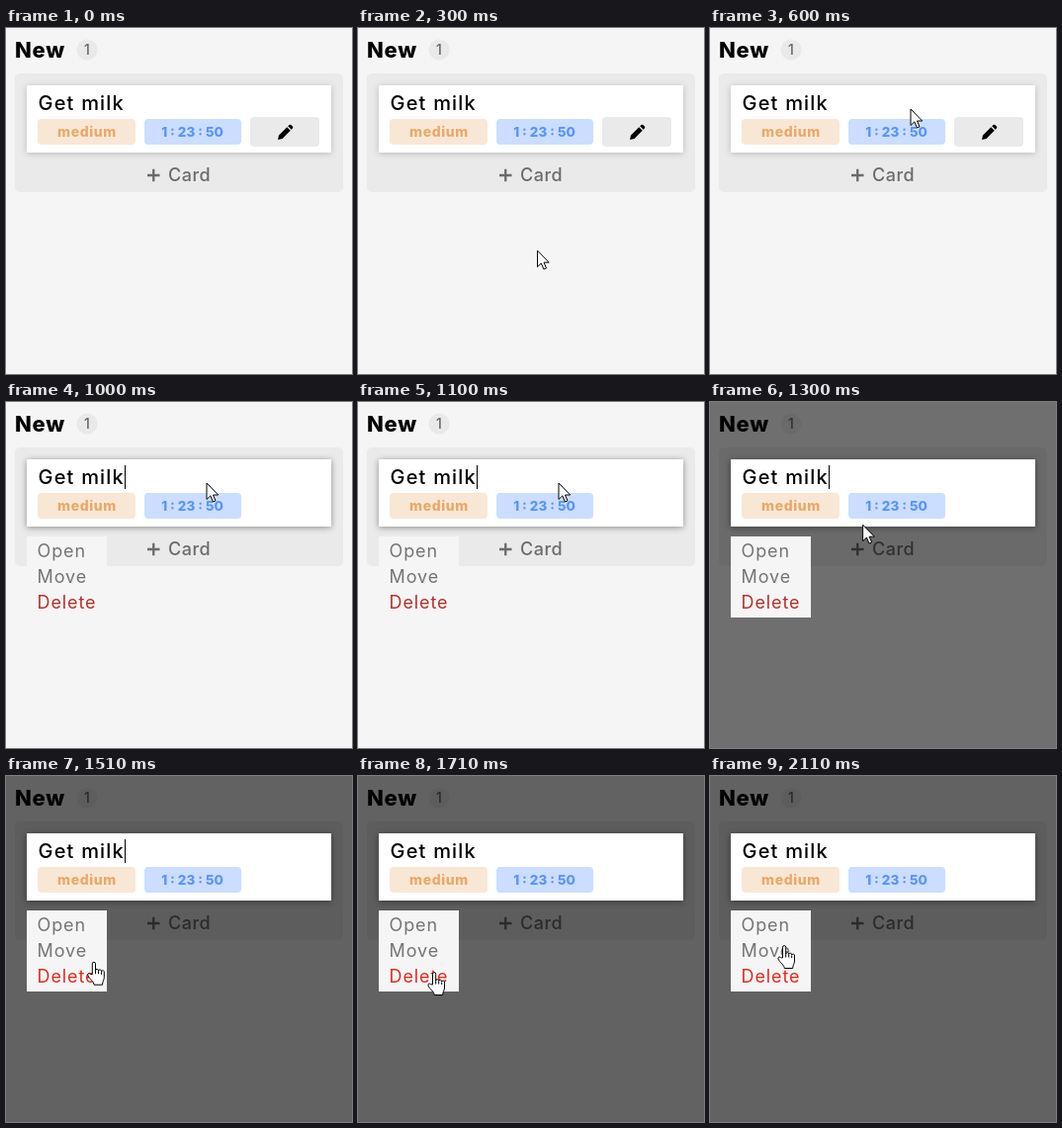
An HTML page that plays this animation: 350 by 350 pixels, repeating every 2.21 s.

```html
<!DOCTYPE html>
<html lang="en">
<head>
<meta charset="utf-8">
<title>Card menu</title>
<style>
  html, body { margin: 0; height: 100%; overflow: hidden; background: #f5f5f5; }
  svg { display: block; width: 350px; height: 350px; font: 500 18px Montserrat, Inter, sans-serif; }
  .title { font-weight: 800; font-size: 22px; letter-spacing: .7px; }
  .name { font-size: 20px; letter-spacing: 1.2px; }
  .chip { font-weight: 800; font-size: 14px; letter-spacing: .6px; text-anchor: middle; }
  .time { font-size: 13.5px; letter-spacing: 0; }
  .add { letter-spacing: .5px; fill: #6b6b6b; }
  .menu { font-weight: 400; letter-spacing: .9px; fill: #747474; }
  #card { filter: drop-shadow(0 1px 3px #0003); }
  .editing #card { filter: drop-shadow(0 1px 3px #0006); }
  #menu, .editing #edit { display: none; }
  .editing #menu { display: inline; }
  #delete { fill: #b3302a; }
  .hovering #delete { fill: #e02c20; }
  .pointer { fill: #fff; stroke: #000; stroke-linejoin: round; }
</style>
</head>
<body>
<svg id="stage" viewBox="0 0 350 350">
  <rect width="350" height="350" fill="#f5f5f5"/>
  <text class="title" x="9" y="30">New</text>
  <circle cx="82" cy="22" r="10.5" fill="#e9e9e9"/>
  <text x="82" y="27" font-size="14" text-anchor="middle" fill="#666">1</text>
  <rect x="9" y="46" width="332" height="120" rx="5" fill="#eaeaea"/>
  <path d="M143 149h12.5M149.250 142.750v12.5" stroke="#6b6b6b" stroke-width="2.3"/>
  <text class="add" x="164" y="155">Card</text>
  <rect id="dim" width="350" height="350" opacity="0"/>

  <g id="card">
    <rect x="21" y="58" width="308" height="68" fill="#fff"/>
    <text class="name" x="32.500" y="83">Get milk</text>
    <rect x="32" y="92" width="99" height="26" rx="4" fill="#f9e7d6"/>
    <text class="chip" x="82" y="110" fill="#e8a968">medium</text>
    <rect x="140" y="92" width="98" height="26" rx="4" fill="#cbdeff"/>
    <text class="chip time" x="188.500" y="110" fill="#5b94f7">1 : 23 : 50</text>
    <g id="edit">
      <rect x="247" y="90" width="70" height="30" rx="4" fill="#eaeaea"/>
      <path d="M275 113l1-4.500 8.200-8.200 3.500 3.500-8.200 8.200zM285.200 99.300l1.200-1.200q1-.8 2 0l1.500 1.500q.8 1 0 2l-1.200 1.200z"/>
    </g>
  </g>
  <path id="caret" d="M120.500 64v24" stroke="#000"/>

  <g id="menu" class="menu">
    <rect x="21" y="136" width="81" height="82" fill="#f5f5f5"/>
    <text x="31.500" y="157">Open</text>
    <text x="31.500" y="183">Move</text>
    <text id="delete" x="31.500" y="209">Delete</text>
  </g>

  <path id="arrow" class="pointer" d="M0 0v16.500l3.800-3.600 2.600 6 2.600-1.100-2.500-5.800h5.200z"/>
  <g id="hand" class="pointer">
    <path d="M5.500 13V2.200a1.600 1.600 0 0 1 3.200 0V9a1.500 1.500 0 0 1 3 .4 1.500 1.500 0 0 1 3 .7 1.400 1.400 0 0 1 2.800 1V16c0 3-1.800 4-1.800 7.500H7.300c0-3-4.800-6-6.300-9.500-.6-1.900 1.500-2.600 2.700-1.200z"/>
    <path d="M8.700 9v3.500M11.700 9.500v3M14.700 10.500v2.500" fill="none"/>
  </g>
</svg>
<script>
  const LOOP = 2210, STEP = 100;
  const EDIT = 1000, FADE = 1100, HOVER = 1500, CARET_OFF = 1600, DROP = 2100;
  const $ = id => document.getElementById(id);
  const show = (id, on) => $(id).setAttribute("visibility", on ? "visible" : "hidden");
  const progress = (t, from, to) => Math.min(1, Math.max(0, (t - from) / (to - from)));
  const smooth = (t, from, to) => {
    const u = progress(t, from, to);
    return u * u * (3 - 2 * u);
  };

  // Sweep in from below, glide to the menu, lift, then drop by one row.
  function pointerAt(t) {
    const enter = smooth(t, 50, 600);
    const glide = smooth(t, FADE, 1590);
    const lift = smooth(t, 1700, 1900);
    return [
      203 + 62 * (1 - enter) - 58 * Math.sin(Math.PI * enter) - 133 * glide - 2 * lift,
      82 + 252 * (1 - enter) + 116 * glide - 46 * lift + (t >= DROP ? 19 : 0)
    ];
  }

  function draw(elapsed) {
    const now = elapsed % LOOP;
    // The picture advances in steps; one of them lasts 10 ms longer.
    const t = Math.floor((now - (now >= HOVER ? 10 : 0)) / STEP) * STEP;
    const editing = t >= EDIT, hovering = t >= HOVER;

    $("stage").classList.toggle("editing", editing);
    $("stage").classList.toggle("hovering", hovering);
    $("dim").setAttribute("opacity", 0.6 * (1 - (1 - progress(t, FADE, 1400)) ** 2.2));
    show("caret", editing && t < CARET_OFF);
    show("arrow", t > 0 && !hovering);
    show("hand", hovering);
    $(hovering ? "hand" : "arrow").setAttribute("transform", `translate(${pointerAt(t)})`);
  }

  const start = performance.now();
  function tick() {
    draw(performance.now() - start);
    requestAnimationFrame(tick);
  }
  tick();
</script>
</body>
</html>
```
